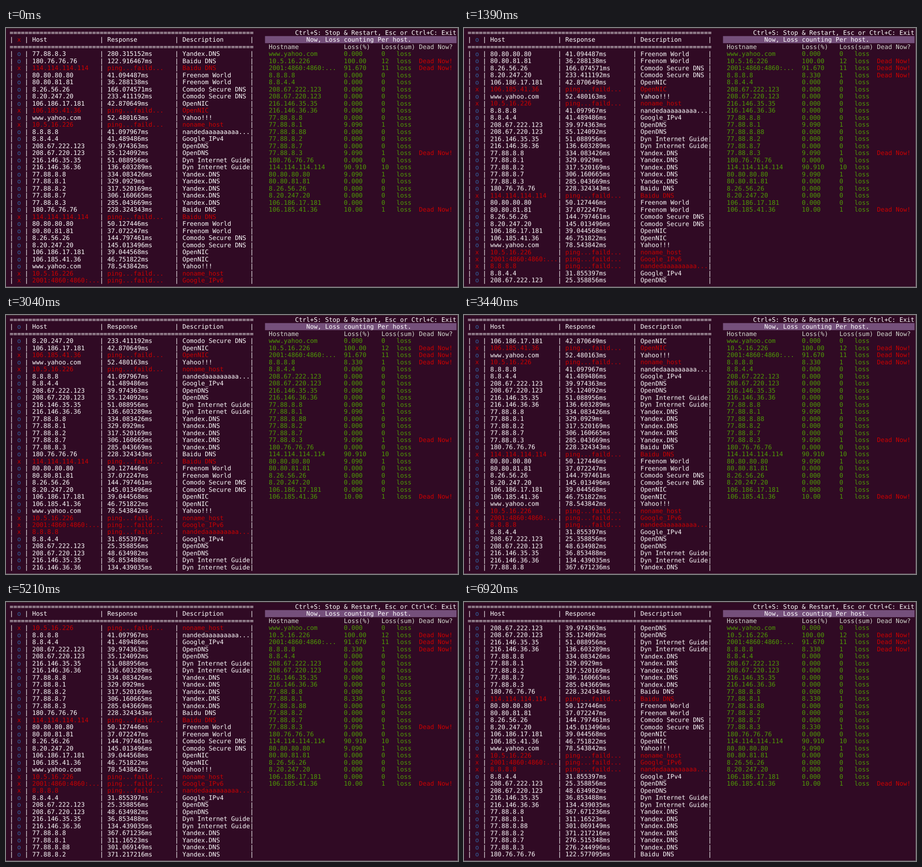
An HTML page for the animation above (8 s loop, 987 by 567 pixels).

```html
<!DOCTYPE html>
<html lang="en">
<head>
<meta charset="utf-8">
<title>Ping monitor</title>
<style>
  html, body { margin: 0; width: 100%; height: 100%; overflow: hidden; background: #300a24; }
  svg { display: block; }
  text {
    font: 13.62px "DejaVu Sans Mono", "Noto Sans Mono", monospace;
    text-rendering: geometricPrecision;
  }
</style>
</head>
<body>
<svg id="screen" width="987" height="567" viewBox="0 0 987 567">
  <clipPath id="upper"><rect y="49" width="987" height="75"/></clipPath>
  <clipPath id="lower"><rect y="124" width="987" height="436"/></clipPath>
  <rect width="987" height="567" fill="#300a24"/>
  <rect width="987" height="1" fill="#3c3530"/>
  <rect x="986" width="1" height="567" fill="#6b5f66"/>
  <rect y="566" width="987" height="1" fill="#6b5f66"/>
</svg>
<script>
const LOOP = 8000;
const CELL = { w: 8.2, h: 15.487, left: 8, top: 2.2, baseline: 12.75 };
const FIRST_ROW = 3, VISIBLE_ROWS = 33;
const WHITE = '#ffffff', GREY = '#d3d7cf', RED = '#cc0000',
      BLUE = '#3465a4', GREEN = '#4e9a06', PURPLE = '#75507b';

const HOSTS = [
  ['Yahoo!!!', 'www.yahoo.com'],
  ['noname_host', '10.5.16.226'],
  ['Google_IPv6', '2001:4860:4860:...'],
  ['nandedaaaaaaaaa...', '8.8.8.8'],
  ['Google_IPv4', '8.8.4.4'],
  ['OpenDNS', '208.67.222.123', '208.67.220.123'],
  ['Dyn Internet Guide', '216.146.35.35', '216.146.36.36'],
  ['Yandex.DNS', '77.88.8.8', '77.88.8.1', '77.88.8.88', '77.88.8.2', '77.88.8.7', '77.88.8.3'],
  ['Baidu DNS', '180.76.76.76', '114.114.114.114'],
  ['Freenom World', '80.80.80.80', '80.80.81.81'],
  ['Comodo Secure DNS', '8.26.56.26', '8.20.247.20'],
  ['OpenNIC', '106.186.17.181', '106.185.41.36'],
].flatMap(([label, ...names]) => names.map(name => ({ name, label })));

// Pings go round the hosts in order: a time in ms, x = failed, _ = not listed.
const PINGS = `
  280.315152 122.916467 x 41.094487 36.288138 166.074571 233.411192 42.870649 x
  52.480163 x _ 41.097967 41.489486 39.974363 35.124092 51.088956 136.603289
  334.083426 329.0929 _ 317.520169 306.160665 285.043669 228.324343 x 50.127446
  37.072247 144.797461 145.013496 39.044568 46.751822
  78.543842 x x x 31.855397 25.358856 48.634982 36.853488 134.439035
  367.671236 311.16523 301.069149 371.217216 276.515348 276.244996 122.577095`
  .trim().split(/\s+/);
const FIRST_HOST = HOSTS.findIndex(h => h.name === '77.88.8.3');

// Loss states per host: [start time, percent, sum, dead].
const LOSSES = {
  '10.5.16.226': [[0, '100.00', 12, true]],
  '2001:4860:4860:...': [[0, '91.670', 11, true]],
  '8.8.8.8': [[0, '0.000', 0], [280, '8.330', 1, true]],
  '77.88.8.1': [[0, '9.090', 1], [4120, '8.330', 1]],
  '77.88.8.3': [[0, '9.090', 1, true], [6390, '8.330', 1]],
  '114.114.114.114': [[0, '90.910', 10]],
  '80.80.80.80': [[0, '9.090', 1]],
  '106.185.41.36': [[0, '10.00', 1, true]],
};

const scrollTimes = repaint =>
  [280, 710, 1390, 1790, 2350, 3040, 3440, 4120, 4680, 5210, repaint, 6390, 6920];

const screen = document.getElementById('screen');

function add(parent, tag, attrs = {}) {
  const el = document.createElementNS('http://www.w3.org/2000/svg', tag);
  for (const key in attrs) el.setAttribute(key, attrs[key]);
  return parent.appendChild(el);
}

function write(parent, row, col, string, fill) {
  add(parent, 'text', {
    x: CELL.left + col * CELL.w,
    y: CELL.top + row * CELL.h + CELL.baseline,
    fill,
  }).textContent = string;
}

// steps: [time, value] pairs held until the next one.
function hold(el, property, steps) {
  const frames = steps.map(([time, value]) =>
    ({ offset: time / LOOP, [property]: value, easing: 'step-end' }));
  frames.push({ offset: 1, [property]: steps.at(-1)[1] });
  el.animate(frames, { duration: LOOP, iterations: Infinity });
}

function showBetween(el, from, to = LOOP) {
  const steps = [[from, 1]];
  if (from > 0) steps.unshift([0, 0]);
  if (to < LOOP) steps.push([to, 0]);
  hold(el, 'opacity', steps);
}

function drawFrame() {
  for (const row of [0, 2]) write(screen, row, 0, '='.repeat(65), WHITE);
  for (let row = 1; row < FIRST_ROW + VISIBLE_ROWS; row++) {
    if (row !== 2) for (const col of [0, 4, 24, 44, 64]) write(screen, row, col, '|', WHITE);
  }
  write(screen, 1, 6, 'Host', WHITE);
  write(screen, 1, 26, 'Response', WHITE);
  write(screen, 1, 46, 'Description', WHITE);

  const failed = add(screen, 'g'), passed = add(screen, 'g');
  write(failed, 1, 2, 'x', RED);
  write(passed, 1, 2, 'o', BLUE);
  showBetween(failed, 0, 710);
  showBetween(passed, 710);
}

function drawLog(clip, times) {
  const pane = add(screen, 'g', { 'clip-path': `url(#${clip})` });
  const log = add(pane, 'g');
  let row = FIRST_ROW;
  PINGS.forEach((ping, i) => {
    if (ping === '_') return;
    const { name, label } = HOSTS[(FIRST_HOST + i) % HOSTS.length];
    const lost = ping === 'x', color = lost ? RED : WHITE;
    write(log, row, 2, lost ? 'x' : 'o', lost ? RED : BLUE);
    write(log, row, 6, name, color);
    write(log, row, 26, lost ? 'ping...faild...' : ping + 'ms', color);
    write(log, row, 46, label, color);
    row++;
  });
  hold(log, 'transform', [0, ...times].map((time, i) =>
    [time, `translateY(${-i * CELL.h}px)`]));
}

function drawLosses() {
  write(screen, 0, 76, 'Ctrl+S: Stop & Restart, Esc or Ctrl+C: Exit', WHITE);
  add(screen, 'rect', {
    x: CELL.left + 68 * CELL.w, y: CELL.top + CELL.h,
    width: 51 * CELL.w, height: CELL.h, fill: PURPLE,
  });
  write(screen, 1, 79, 'Now, Loss counting Per host.', WHITE);
  write(screen, 2, 69, 'Hostname', GREY);
  write(screen, 2, 89, 'Loss(%)', GREY);
  write(screen, 2, 99, 'Loss(sum)', GREY);
  write(screen, 2, 109, 'Dead Now?', GREY);

  HOSTS.forEach(({ name }, i) => {
    const row = FIRST_ROW + i;
    const states = LOSSES[name] || [[0, '0.000', 0]];
    write(screen, row, 69, name, GREEN);
    write(screen, row, 103, 'loss', GREEN);
    states.forEach(([from, percent, sum, dead], n) => {
      const state = add(screen, 'g');
      write(state, row, 89, percent, GREEN);
      write(state, row, 99, sum, GREEN);
      if (dead) write(state, row, 109, 'Dead Now!', RED);
      if (states.length > 1) showBetween(state, from, states[n + 1]?.[0]);
    });
  });
}

drawFrame();
// The top five rows repaint slightly before the rest on one step.
drawLog('upper', scrollTimes(5710));
drawLog('lower', scrollTimes(5860));
drawLosses();
</script>
</body>
</html>
```
